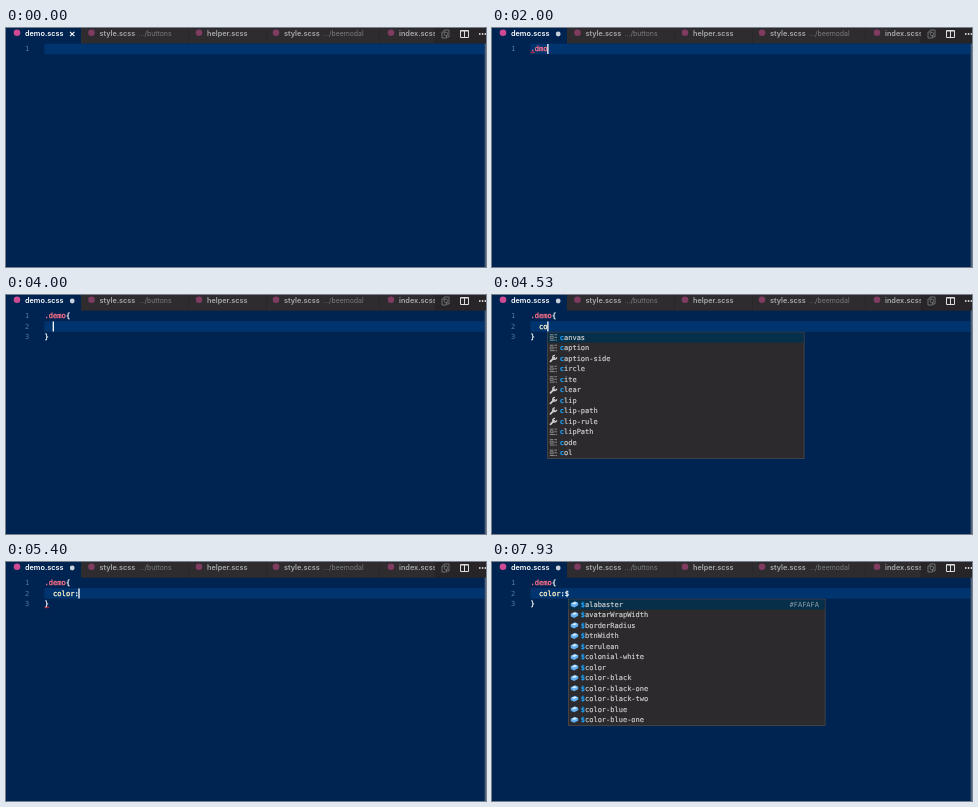
Recreate the animation shown at these times as an HTML page. Size 480 px wide and 239 px high, loop 8 s.

```html
<!DOCTYPE html>
<html lang="en">
<head>
<meta charset="utf-8">
<title>Typing SCSS in an editor</title>
<style>
  html, body { margin: 0; width: 100%; height: 100%; overflow: hidden; background: #002451; }
  svg { display: block; width: 100%; height: 100%; }
  text { white-space: pre; }
  .ui { font-family: Inter, "Open Sans", sans-serif; }
  .mono { font-family: "DejaVu Sans Mono", "Noto Sans Mono", monospace; }
</style>
</head>
<body>
<svg id="stage" viewBox="0 0 480 239" preserveAspectRatio="none">
  <rect width="480" height="239" fill="#002451"/>
  <g id="tabs"></g>
  <g id="code"></g>
  <rect id="caret" width="1.3" height="10" fill="#fff"/>
  <path d="M479.3 15.5V239" stroke="#5b6b80" stroke-width="1.2"/>
  <g id="popup"></g>
</svg>
<script>
const LOOP = 8000, LEFT = 38.5, CHAR = 4.28, TOP = 15.7, ROW = 10.49;
const $ = id => document.getElementById(id);

function add(parent, tag, attrs, content) {
  const el = document.createElementNS("http://www.w3.org/2000/svg", tag);
  for (const key in attrs) el.setAttribute(key, attrs[key]);
  if (content !== undefined) el.textContent = content;
  parent.appendChild(el);
  return el;
}
const rect = (g, x, y, width, height, fill, more) =>
  add(g, "rect", { x, y, width, height, fill, ...more });
const path = (g, d, stroke, width = 1, more) =>
  add(g, "path", { d, stroke, fill: "none", "stroke-width": width, ...more });
const label = (g, x, y, str, fill, size, more) =>
  add(g, "text", { x, y, fill, "font-size": size, class: "mono", ...more }, str);

// Tab bar
const tabs = $("tabs");
rect(tabs, 75, 0, 405, 15.5, "#272528");
const files = [
  [0, 75, "demo.scss", 19],
  [75, 183, "style.scss", 93.5, ".../buttons", 132.5],
  [183, 261, "helper.scss", 201],
  [261, 374, "style.scss", 278, ".../beemodal", 317],
  [374, 429, "index.scss", 393]
];
files.forEach(([x, end, name, nameX, folder, folderX], i) => {
  if (i) rect(tabs, x, 0, end - x - .6, 15.5, "#2e2c2f");
  add(tabs, "circle", { cx: nameX - 8, cy: 4.8, r: 3.3, fill: "#cf4a92", opacity: i ? .5 : 1 });
  label(tabs, nameX, 8.4, name, i ? "#a9a9a9" : "#fff", 7.3, { class: "ui", "font-weight": 600 });
  if (folder) label(tabs, folderX, 8.4, folder, "#7d7d7d", 6.9, { class: "ui" });
});
rect(tabs, 429, 0, 51, 15.5, "#272528");
path(tabs, "M438 3.5V2h5v7h-2M436 4h3.5M436 4v6h4.5V7", "#777", .9);
add(tabs, "circle", { cx: 440, cy: 6, r: 1.8, fill: "none", stroke: "#777", "stroke-width": .8 });
path(tabs, "M454.5 2.5h8v7h-8zM458.5 2.5v7M454.5 3h8", "#ddd", 1);
for (const cx of [473.8, 476.6, 479.4]) add(tabs, "circle", { cx, cy: 6, r: .9, fill: "#ddd" });
const closeMark = path(tabs, "M64 3.8l4.4 4.4m0-4.4L64 8.2", "#fff", 1.2);
const dirtyMark = add(tabs, "circle", { cx: 66.2, cy: 6, r: 2.4, fill: "#c9d1dc" });

// Each step: start time, text with | as the caret, popup prefix, squiggled line
const block = str => `.demo{\n  ${str}|\n}`;
const steps = [
  [0, "|"],
  [1070, ".|", "", 0], [1400, ".d|", "", 0], [1730, ".dm|", "", 0], [1930, ".dmo|", "", 0],
  [2130, ".dm|", "", 0], [2270, ".d|", "", 0], [2470, ".de|", "", 0],
  [2670, ".dem|", "", 0], [2930, ".demo|", "", 0],
  [3130, ".demo{|}", "", 0], [3270, ".demo{}|", "", 0], [3530, ".demo{|}", "", 0],
  [3730, block("")],
  [4330, block("c"), "c"], [4530, block("co"), "c"], [4600, block("co"), "co"],
  [4730, block("col"), "col"], [4870, block("colo"), "colo"], [5070, block("color"), "color"],
  [5200, block("color:"), "", 2],
  [6470, block("color:$"), "$", 2], [6800, block("color:$"), "$"]
];
const hidden = [[0, 70], [570, 870], [5870, 6330], [6970, 7400], [7860, 8000]];

// A leading * marks a property
const words = ("canvas caption *caption-side circle cite *clear *clip *clip-path *clip-rule clipPath " +
  "code col colgroup *color *color-interpolation-filters *column-count *column-fill *column-gap " +
  "*column-rule *column-span *column-width *columns *content").split(" ");
const variables = ("alabaster avatarWrapWidth borderRadius btnWidth cerulean colonial-white color " +
  "color-black color-black-one color-black-two color-blue color-blue-one").split(" ").map(v => "$" + v);

function drawIcon(g, kind, x, y) {
  if (kind === "variable") {
    add(g, "path", { d: `M${x} ${y - 1}l4-2 3.4 1.4v2.6l-4 2.1-3.4-1.5z`, fill: "#62aef0" });
    add(g, "path", { d: `M${x + .9} ${y - .9}l3.1-1.4 2.4 1-3 1.5z`, fill: "#d9ecfb" });
  } else if (kind === "property") {
    path(g, `M${x + .7} ${y + 3}l3.6-3.6`, "#d0d0d0", 1.8, { "stroke-linecap": "round" });
    path(g, `M${x + 5.2} ${y - 2.9}a1.9 1.9 0 1 0 1.6 1.8`, "#d0d0d0", 1.4);
  } else {
    path(g, `M${x} ${y - 2.6}h3.6M${x + 4.6} ${y - 2.6}h2.6M${x} ${y + 2.8}h5M${x + 5.8} ${y + 2.8}h1.4` +
      `M${x + 4.6} ${y}h2.6`, "#939393", .9);
    path(g, `M${x + .4} ${y - 1}h3v2h-3z`, "#939393", .8);
  }
}

let scrollbar = null;
function drawPopup(prefix) {
  const g = $("popup");
  g.replaceChildren();
  scrollbar = null;
  if (!prefix) return;
  const vars = prefix === "$";
  const list = vars ? variables : words.filter(w => w.replace("*", "").startsWith(prefix)).slice(0, 12);
  const x = vars ? 76 : 55, y = 36.9, width = 257.5;
  rect(g, x + .4, y + .3, width - .8, list.length * ROW + .4, "#2c2a2d", { stroke: "#4b494c", "stroke-width": .8 });
  rect(g, x + .8, y + .6, width - 1.6, ROW - .4, "#062f4a");
  list.forEach((item, i) => {
    const mid = y + .2 + (i + .5) * ROW, name = item.replace("*", "");
    drawIcon(g, vars ? "variable" : item[0] === "*" ? "property" : "keyword", x + 2.8, mid);
    const el = label(g, x + 12.8, mid + 2.4, "", "#d4d4d4", 7, { stroke: "#d4d4d4", "stroke-width": .15 });
    add(el, "tspan", { fill: "#18a3ff", stroke: "#18a3ff", "font-weight": 700 }, prefix);
    add(el, "tspan", {}, name.slice(prefix.length));
  });
  if (vars) {
    label(g, 327, y + ROW / 2 + 2.6, "#FAFAFA", "#8d9ba5", 7, { "text-anchor": "end" });
    scrollbar = rect(g, 327.5, y + .7, 5.3, 27, "#797979");
  }
}

function drawCode(text, wavy) {
  const g = $("code"), lines = text.split("\n");
  const line = lines.findIndex(s => s.includes("|")), col = lines[line].indexOf("|");
  g.replaceChildren();
  rect(g, LEFT, TOP + line * ROW, 440, ROW, "#00346e");
  lines.forEach((raw, i) => {
    const str = raw.replace("|", ""), base = TOP + i * ROW + 7.5;
    label(g, 19, base, i + 1, "#527aa5", 7);
    for (const { 0: part, index } of str.matchAll(/\.\w*|[{}]|\w+|[:$]/g)) {
      const fill = part[0] === "." ? "#ff7088" : /\w/.test(part) ? "#fff3c8" : "#fff";
      label(g, LEFT + index * CHAR, base, part, fill, 7.11, { stroke: fill, "stroke-width": .3 });
    }
    if (str.endsWith("{}")) for (const n of [5, 6])
      rect(g, LEFT + n * CHAR, TOP + .5, CHAR, ROW - 1, "#0a4a50", { "fill-opacity": .3, stroke: "#8b9797", "stroke-width": .6 });
  });
  if (wavy !== undefined) {
    const y = TOP + (wavy + 1) * ROW - 1;
    path(g, `M${LEFT} ${y}l1.1-1.4 1.1 1.4 1.1-1.4 1.1 1.4`, "#ff2b2b", .8);
  }
  $("caret").setAttribute("x", LEFT + col * CHAR - .4);
  $("caret").setAttribute("y", TOP + line * ROW + .3);
}

let current = null;
function render(t) {
  const step = steps.findLast(s => s[0] <= t);
  if (step !== current) {
    current = step;
    drawCode(step[1], step[3]);
    drawPopup(step[2]);
    const clean = step[1] === "|";
    closeMark.setAttribute("opacity", clean ? 1 : 0);
    dirtyMark.setAttribute("opacity", clean ? 0 : 1);
  }
  $("caret").setAttribute("opacity", hidden.some(([a, b]) => t >= a && t < b) ? 0 : 1);
  if (scrollbar) scrollbar.setAttribute("opacity", .13 * Math.max(0, Math.min(1, (7270 - t) / 600)));
}

const start = performance.now();
function tick() {
  render((performance.now() - start) % LOOP);
  requestAnimationFrame(tick);
}
tick();
</script>
</body>
</html>
```
